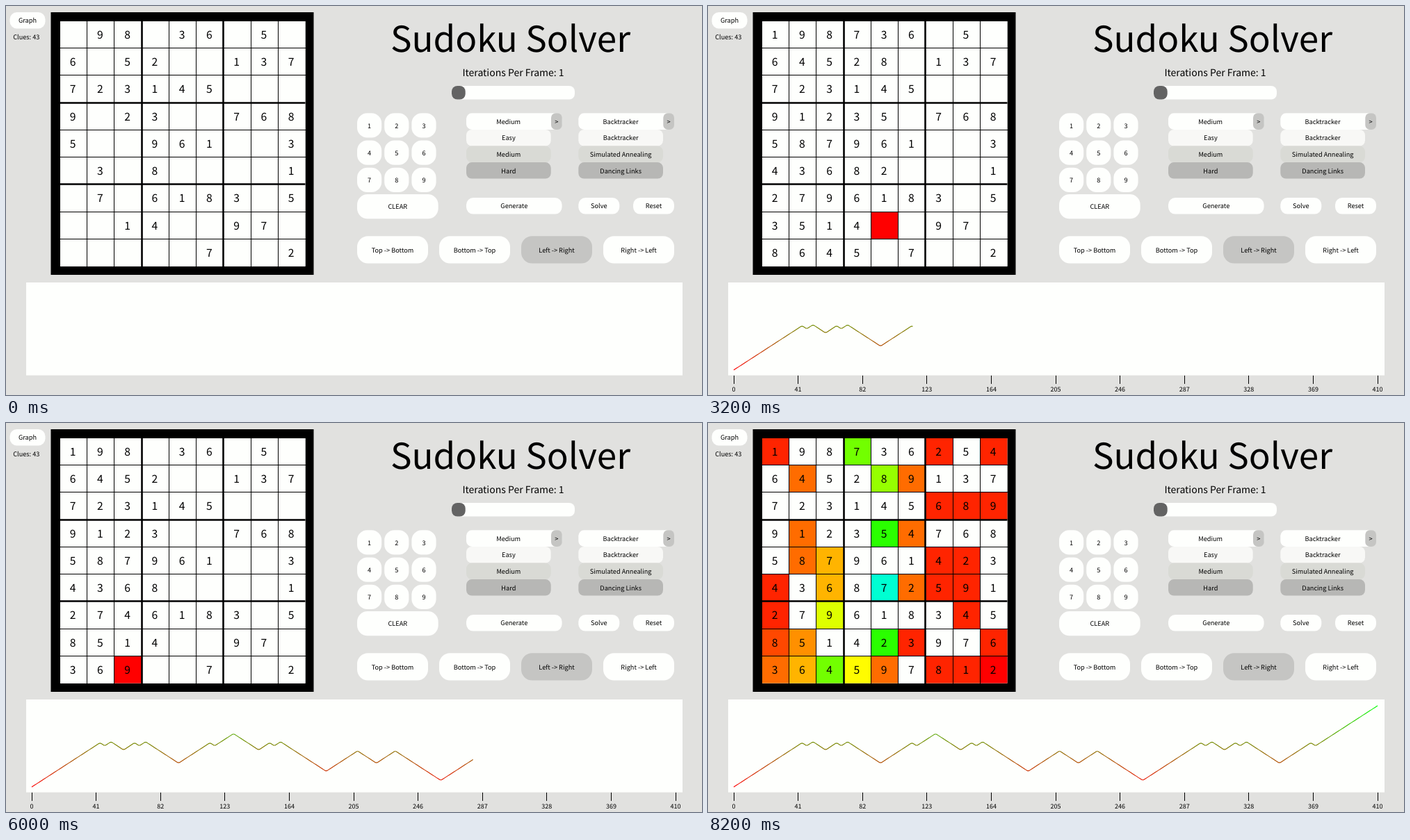
Write an HTML page that moves like this. It is 1001 px wide and 560 px high and loops after 9.6 s.

```html
<!DOCTYPE html>
<html lang="en">
<head>
<meta charset="utf-8">
<title>Sudoku Solver</title>
<style>
  html, body { margin: 0; width: 100%; height: 100%; overflow: hidden; background: #e1e1df; }
  svg { display: block; width: 1001px; height: 560px; }
  text {
    font-family: "Noto Sans CJK JP", "Noto Sans CJK SC", "Noto Sans CJK", "Noto Sans", sans-serif;
    text-anchor: middle;
    text-rendering: geometricPrecision;
  }
  .thin, .tick { stroke: #000; stroke-width: 1; shape-rendering: crispEdges; }
  .thick { stroke: #000; stroke-width: 2.6; }
</style>
</head>
<body>
<svg id="stage" viewBox="0 0 1001 560">
  <defs>
    <linearGradient id="height" gradientUnits="userSpaceOnUse" x1="0" y1="524" x2="0" y2="407">
      <stop offset="0" stop-color="#f00"/>
      <stop offset="1" stop-color="#0f0"/>
    </linearGradient>
  </defs>
</svg>
<script>
const WHITE = '#fefffd', GREY = '#c5c5c3', SMALL = 9.2;
const LOOP = 9600, FRAME = 100;
const BOARD = { x: 77.3, y: 21.4, cell: 39.25 };
const GRAPH = { x: 37, y: 524, width: 926, height: 117 };
const CLUES = [
  '.98.36.5.', '6.52..137', '723145...',
  '9.23..768', '5..961..3', '.3.8....1',
  '.7.6183.5', '..14..97.', '.....7..2'
];

const stage = document.getElementById('stage');

function add(tag, attrs, parent = stage) {
  const el = document.createElementNS('http://www.w3.org/2000/svg', tag);
  for (const key in attrs) el.setAttribute(key, attrs[key]);
  return parent.appendChild(el);
}

function box(x, y, width, height, fill, rx = 0) {
  return add('rect', { x, y, width, height, fill, rx });
}

// Centres a line of text on cy by its capital height.
function label(str, cx, cy, size = SMALL, parent = stage) {
  const el = add('text', { x: cx, y: cy + size * 0.367, 'font-size': size }, parent);
  el.textContent = str;
  return el;
}

function button(str, x, y, w, h, rx, fill = WHITE) {
  box(x, y, w, h, fill, rx);
  label(str, x + w / 2, y + h / 2 + 0.3);
}

function line(x1, y1, x2, y2, cls, parent = stage) {
  add('line', { x1, y1, x2, y2, class: cls }, parent);
}

// Cells are numbered down each column, columns from left to right.
const rowOf = i => i % 9;
const colOf = i => Math.floor(i / 9);
const third = n => Math.floor(n / 3);

function solve() {
  const grid = Array.from({ length: 81 }, (_, i) => +CLUES[rowOf(i)][colOf(i)] || 0);
  const fixed = grid.map(v => v > 0);
  const changes = grid.map(() => 0);
  const steps = [];
  const record = pos => steps.push({ pos, grid: grid.slice() });

  const fits = (pos, v) => grid.every((other, i) => {
    if (other !== v || i === pos) return true;
    const r = rowOf(i), c = colOf(i), pr = rowOf(pos), pc = colOf(pos);
    return r !== pr && c !== pc && (third(r) !== third(pr) || third(c) !== third(pc));
  });

  let pos = 0, back = false;
  while (true) {
    if (!fixed[pos]) {
      const old = grid[pos];
      let v = old + 1;
      while (v < 10 && !fits(pos, v)) v++;
      grid[pos] = v < 10 ? v : 0;
      if (grid[pos] !== old) changes[pos]++;
      // Turning round costs one extra step on the same cell.
      if (back === grid[pos] > 0) {
        record(pos);
        back = !back;
      }
    }
    record(pos);
    if (pos === 80) break;
    pos += back ? -1 : 1;
  }
  return { steps, changes, fixed, start: fixed.map((f, i) => f ? grid[i] : 0) };
}

const { steps, changes, fixed, start } = solve();
const last = steps.length - 1;

// Board
box(64.5, 9, 378, 378, '#000');
box(78, 22, 352.5, 352.8, WHITE);
const cells = start.map((_, i) => {
  const x = BOARD.x + colOf(i) * BOARD.cell, y = BOARD.y + rowOf(i) * BOARD.cell;
  const left = Math.max(78, Math.floor(x)), top = Math.max(22, Math.floor(y));
  return {
    back: box(left, top, Math.min(430.5, x + BOARD.cell) - left,
      Math.min(374.8, y + BOARD.cell) - top, WHITE),
    cx: x + BOARD.cell / 2 - 0.8,
    cy: y + BOARD.cell / 2
  };
});
for (let k = 1; k < 9; k++) {
  const cls = k % 3 ? 'thin' : 'thick';
  const x = Math.floor(BOARD.x + k * BOARD.cell) + 0.5;
  const y = Math.floor(BOARD.y + k * BOARD.cell) + 0.5;
  line(x, 22, x, 375, cls);
  line(78, y, 430.5, y, cls);
}
cells.forEach(cell => { cell.digit = label('', cell.cx, cell.cy, 15.7); });

// Controls
button('Graph', 5.5, 9, 51, 23.5, 10);
label('Clues: 43', 29.3, 44.7);
label('Sudoku Solver', 725.5, 47.5, 51.2);
label('Iterations Per Frame: 1', 729.5, 96, 14);
box(641, 115, 177, 19.5, WHITE, 8);
box(641, 115, 19.7, 19.5, '#636363', 8);

for (let n = 0; n < 9; n++) {
  button(n + 1, 505 + n % 3 * 39.2, 154.3 + third(n) * 39.2, 35.2, 35.2, 14.5);
}
button('CLEAR', 505, 271, 116.7, 35.3, 15);

function dropdown(x, choice, items) {
  box(x, 154.3, 137.5, 23.6, WHITE, 8);
  label(choice, x + 60.7, 166.6);
  box(x + 122, 154.3, 15.7, 23.6, GREY, 6.5);
  label('>', x + 129.8, 166.6);
  ['#f8f8f6', '#d9dad5', '#b7b7b5'].forEach((fill, i) =>
    button(items[i], x, 178 + i * 23.55, 121.7, 23.5, 8, fill));
}
dropdown(662, 'Medium', ['Easy', 'Medium', 'Hard']);
dropdown(823.3, 'Backtracker', ['Backtracker', 'Simulated Annealing', 'Dancing Links']);

button('Generate', 662, 276, 137.6, 23.6, 10);
button('Solve', 823.3, 276, 59, 23.6, 10);
button('Reset', 902, 276, 59, 23.6, 10);
['Top -> Bottom', 'Bottom -> Top', 'Left -> Right', 'Right -> Left'].forEach((str, i) =>
  button(str, 505 + i * 118, 331.2, 102, 39.3, 15.7, i === 2 ? GREY : WHITE));

// Graph
box(29, 398, 944, 133.7, WHITE);
const axis = add('g', {});
for (let k = 0; k <= 10; k++) {
  const x = GRAPH.x + k * GRAPH.width / 10;
  line(Math.floor(x) + 0.5, 532, Math.floor(x) + 0.5, 544, 'tick', axis);
  label(k * last / 10, x, 551.5, 9, axis);
}
const curve = add('polyline', { fill: 'none', stroke: 'url(#height)', 'stroke-width': 1.1 });
const points = steps.map(({ pos }, i) =>
  (GRAPH.x + i * GRAPH.width / last).toFixed(2) + ',' +
  (GRAPH.y - pos * GRAPH.height / 80).toFixed(2));

function stepAt(time) {
  const frame = Math.floor(time / FRAME);
  if (frame < 14) return 0;
  return Math.min(last, Math.floor(54.4 + 5.975 * (frame - 22)));
}

function fillOf(i, pos, done) {
  if (i === pos) return '#f00';
  return done && !fixed[i] ? `hsl(${changes[i] * 6 / 255 * 360}, 100%, 50%)` : WHITE;
}

function draw(n) {
  const done = n === last;
  const { pos, grid } = n ? steps[done ? last : n - 1] : { pos: -1, grid: start };
  cells.forEach((cell, i) => {
    cell.back.setAttribute('fill', fillOf(i, pos, done));
    cell.digit.textContent = grid[i] || '';
  });
  axis.setAttribute('visibility', n ? 'visible' : 'hidden');
  curve.setAttribute('points', n ? points.slice(0, n + 1).join(' ') : '');
}

let shown = -1;
const begin = performance.now();
function tick() {
  const n = stepAt((performance.now() - begin) % LOOP);
  if (n !== shown) draw(shown = n);
  requestAnimationFrame(tick);
}
tick();
</script>
</body>
</html>
```
